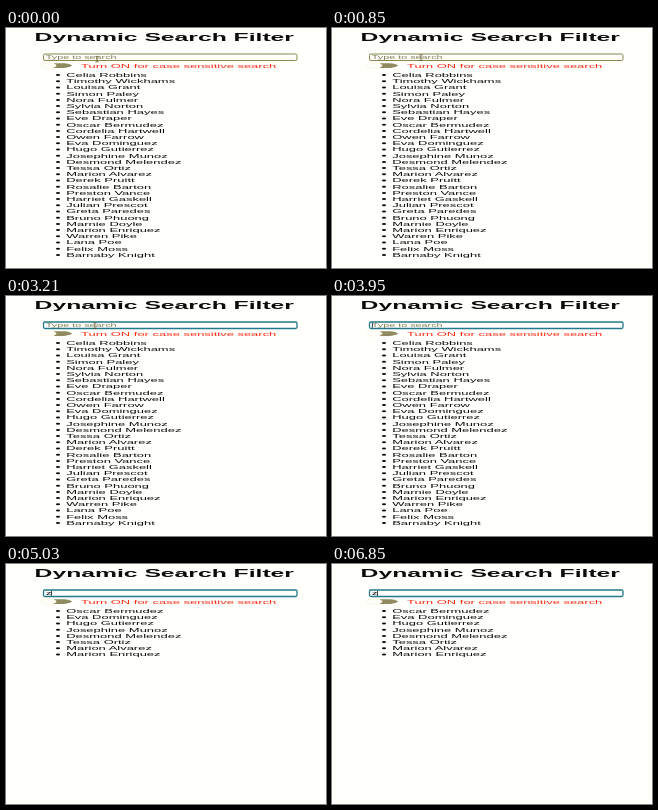
Animation of 320x240 px, one loop 8 s. Source, as an HTML page:

```html
<!DOCTYPE html>
<html lang="en">
<head>
<meta charset="utf-8">
<title>Dynamic Search Filter</title>
<style>
  html, body { margin: 0; width: 100%; height: 100%; overflow: hidden; background: #fffffb; }
  svg { display: block; width: 100%; height: 100%; }
  text { font-family: "Liberation Sans", Arial, sans-serif; white-space: pre; }
</style>
</head>
<body>
<svg id="stage" viewBox="0 0 320 240" preserveAspectRatio="none"></svg>
<script>
const LOOP = 8000;
const SX = 0.81, SY = 0.355;      // the tall page is squeezed into the stage
const ROW_TOP = 49, ROW_STEP = 6.2;
const FOCUS = 970, HIDE_POINTER = 3650, TYPE = 4050;
const QUERY = "z";

const NAMES = [
  "Celia Robbins", "Timothy Wickhams", "Louisa Grant", "Simon Paley", "Nora Fulmer",
  "Sylvia Norton", "Sebastian Hayes", "Eve Draper", "Oscar Bermudez", "Cordelia Hartwell",
  "Owen Farrow", "Eva Dominguez", "Hugo Gutierrez", "Josephine Munoz", "Desmond Melendez",
  "Tessa Ortiz", "Marion Alvarez", "Derek Pruitt", "Rosalie Barton", "Preston Vance",
  "Harriet Gaskell", "Julian Prescot", "Greta Paredes", "Bruno Phuong", "Marnie Doyle",
  "Marion Enriquez", "Warren Pike", "Lana Poe", "Felix Moss", "Barnaby Knight"
];

const stage = document.getElementById("stage");

function add(tag, attrs, parent = stage) {
  const el = document.createElementNS("http://www.w3.org/2000/svg", tag);
  for (const key in attrs) el.setAttribute(key, attrs[key]);
  parent.appendChild(el);
  return el;
}

function label(str, x, y, size, fill, parent = stage, weight = 400) {
  const el = add("text", {
    transform: `translate(${x} ${y}) scale(${SX} ${SY})`,
    "font-size": size, "font-weight": weight, fill
  }, parent);
  el.textContent = str;
  return el;
}

const show = (el, on) => el.setAttribute("visibility", on ? "visible" : "hidden");
const within = (t, from, to) => t >= from && t < to;

add("rect", { width: 320, height: 240, fill: "#fffffb" });
label("Dynamic Search Filter", 28.6, 13.2, 30.5, "#0c0c0c", stage, 700);

// search field
const field = add("rect", { x: 37.5, y: 26, width: 253.5, height: 6.5, rx: 1.5, fill: "#fffffd" });
const hint = label("Type to search", 39.8, 31.2, 13.33, "#80805a");
const typed = label(QUERY, 40, 31.2, 13.33, "#0c0c0c");
const caret = add("rect", { y: 26.8, width: 0.9, height: 5, fill: "#10302c" });

// switch
add("path", { d: "M48 35.2H58Q64 35.6 66 37.6Q64 39.6 58 40H48Z", fill: "#8f8a60" });
add("ellipse", { cx: 42.3, cy: 37.6, rx: 8, ry: 2.5, fill: "#fffffa", stroke: "#f6efcd", "stroke-width": 0.4 });
label("Turn ON for case sensitive search", 75, 39.9, 16, "#fb2a16");

// list
const rows = NAMES.map(name => {
  const el = add("g", {});
  add("ellipse", { cx: 52, cy: -1.9, rx: 2.1, ry: 1, fill: "#0c0c0c" }, el);
  label(name, 60.2, 0, 16, "#0c0c0c", el);
  return { name, el };
});

// I-beam pointer
const pointer = add("path", {
  d: "M-1.6 -2.8H-0.4L0 -2.4L0.4 -2.8H1.6M0 -2.4V2.4M-1.6 2.8H-0.4L0 2.4L0.4 2.8H1.6",
  fill: "none", stroke: "#5c4a1c", "stroke-width": 0.8
});

function filter(query) {
  let n = 0;
  for (const row of rows) {
    const hit = row.name.toLowerCase().includes(query);
    show(row.el, hit);
    if (hit) row.el.setAttribute("transform", `translate(0 ${ROW_TOP + ROW_STEP * n++})`);
  }
}

function draw(t) {
  const focused = t >= FOCUS, filled = t >= TYPE;
  field.setAttribute("stroke", focused ? "#23798a" : "#7a7a3a");
  field.setAttribute("stroke-width", focused ? 1.3 : 0.9);
  show(hint, !filled);
  show(typed, filled);

  show(caret, within(t, FOCUS, 2370) || within(t, HIDE_POINTER, 5350) || t >= 6850);
  caret.setAttribute("x", filled ? 45 : 39.9);

  const p = Math.min(1, Math.max(0, (t - 20) / 400));
  const ease = p * p * (3 - 2 * p);
  pointer.setAttribute("transform", `translate(${91 - 2 * ease} ${31.2 - 1.6 * ease})`);
  show(pointer, t < HIDE_POINTER);

  filter(filled ? QUERY : "");
}

const start = performance.now();
function tick() {
  draw((performance.now() - start) % LOOP);
  requestAnimationFrame(tick);
}
draw(0);
requestAnimationFrame(tick);
</script>
</body>
</html>
```
